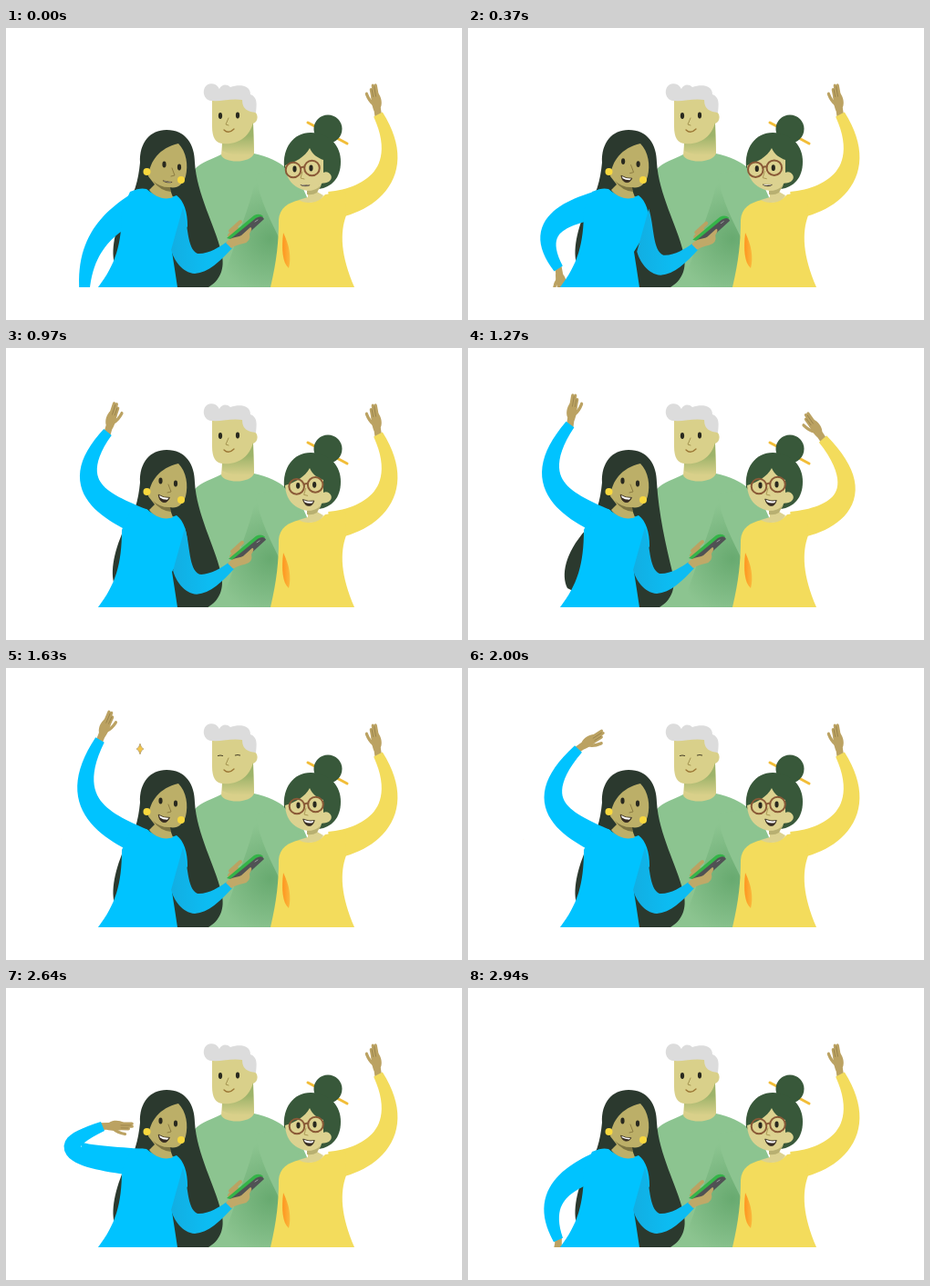
An HTML page for the animation above (2980 ms loop, 500 px wide and 321 px high).

```html
<!DOCTYPE html>
<html lang="en">
<head>
<meta charset="utf-8">
<title>Three friends waving</title>
<style>
  html, body { margin: 0; width: 100%; height: 100%; overflow: hidden; background: #fff; }
  svg { display: block; width: 100vw; height: 100vh; }
  .line { fill: none; stroke-linecap: round; stroke-linejoin: round; }
</style>
</head>
<body>
<svg viewBox="0 0 500 321">
  <defs>
    <clipPath id="floor"><rect width="500" height="285"/></clipPath>
    <radialGradient id="greenShade" gradientUnits="userSpaceOnUse" cx="290" cy="232" r="62">
      <stop offset="0" stop-color="#68aa70"/>
      <stop offset="1" stop-color="#68aa70" stop-opacity="0"/>
    </radialGradient>
    <linearGradient id="neckShade" x2="0" y2="1">
      <stop offset=".4" stop-color="#9db36a"/>
      <stop offset="1" stop-color="#d9d08a"/>
    </linearGradient>
    <linearGradient id="orangeShade">
      <stop offset="0" stop-color="#ff9420"/>
      <stop offset="1" stop-color="#f9b83c"/>
    </linearGradient>
    <linearGradient id="sleeveShade">
      <stop offset="0" stop-color="#12aee2"/>
      <stop offset=".6" stop-color="#0cbcf2"/>
    </linearGradient>
    <g id="hand">
      <path d="M-4.500 4 L-4.500 -7 C-8 -12 -7 -19 -4 -23 L5 -22 C7 -16 6 -9 4.500 -4 L4.500 4 Z"/>
      <path class="line" stroke="#bba262" stroke-width="3.800" d="M-2.500 -20 L-2 -32 M1 -20 L1.500 -32 M4 -19 L4.500 -28 M4 -12 Q9 -16 11 -24"/>
      <path class="line" stroke="#8d7845" stroke-width=".7" d="M-.4 -20 L0 -31 M3 -20 L3.500 -28"/>
    </g>
    <path id="star" d="M0 -7.500 Q1.200 -1.500 5 0 Q1.200 1.500 0 7.500 Q-1.200 1.500 -5 0 Q-1.200 -1.500 0 -7.500 Z" fill="#f3c548" stroke="#8d7238" stroke-width=".7"/>
    <g id="grin">
      <path d="M-7 -3 Q0 0 7 -1.500 Q5 5 0 4.500 Q-5 4 -7 -3 Z" fill="#382d22" stroke="#382d22" stroke-width=".8"/>
      <path d="M-6 -2.300 Q0 .2 6 -1 L4.600 1.300 Q-1 1.900 -4.600 .2 Z" fill="#fff"/>
    </g>
  </defs>

  <use id="starLeft" href="#star"/>
  <use id="starTop" href="#star"/>

  <g clip-path="url(#floor)">
    <g id="man">
      <path fill="#8cc490" d="M206 156 C214 147 227 144 236 139 L272 138 C286 141 300 147 307 154 L322 168 L334 195 L330 285 L205 285 Z"/>
      <path fill="url(#greenShade)" d="M273 163 C272 185 258 215 235 285 L300 285 L300 225 Z"/>
      <path fill="#8cc490" d="M273 160 C278 190 292 215 300 232 L325 190 L307 154 Z"/>
      <path fill="#d9d08a" d="M226 78 L226 108 C226 121 230 126 237 127 L236 140 C240 149 268 149 272 138 L271 105 C277 103 277 94 272 92 L264 75 Z"/>
      <path fill="url(#neckShade)" d="M271 104 L272 138 Q254 143 237 135 L237 127 C255 129 267 119 271 104 Z"/>
      <path fill="#dcdcdc" d="M225 80 C215 79 214 64 223 61.500 C230 60 232 64 234 67 C236 62 242 61 246 65 C255 62 268 62 268 73 C276 76 275 84 274 93 C266 92 259 90 259 79 C247 77 237 81 225 80 Z"/>
      <g id="manEyes"></g>
      <path class="line" stroke="#a3934f" stroke-width="1" d="M244 99 L241 106 L244 107"/>
      <path class="line" stroke="#9b7735" stroke-width="1.300" d="M239 112 Q244 117 250 111"/>
    </g>

    <g id="blueWoman">
      <path id="longHair" fill="#2b392e"/>
      <use id="blueHand" href="#hand" fill="#bba262"/>
      <path id="blueArm" fill="#00c3ff"/>
      <path fill="#00c3ff" d="M136 180 C145 176 150 176 154 177 C162 184 174 189 187 184 C195 190 199 202 199 218 L182 246 Q185 265 188 285 L101 285 C120 260 127 238 127 200 Z"/>
      <path fill="#bcaf68" d="M156 163 C158 146 168 132 189 127 C198 136 200 151 197 163 C194 173 187 177 179 175 L183 186 C174 190 162 185 157 178 L163 172 Z"/>
      <path fill="#7f7643" d="M161 168 Q170 176 180 175 L181 180 Q169 179 161 168 Z"/>
      <g id="blueFace">
        <g id="blueEyes"></g>
        <path class="line" stroke="#8d7d43" stroke-width="1" d="M178 150 L181 158 L177 159"/>
        <use id="blueMouth" href="#grin"/>
      </g>
      <g fill="#f8d83e"><circle cx="154.500" cy="158" r="4"/><circle cx="192" cy="167" r="4"/></g>
      <g id="phoneArm">
        <path fill="url(#sleeveShade)" d="M194 197 C200 215 198 243 210 248 C221 249 234 241 242 235 L248 242 C235 256 222 269 207 270 C193 269 184 255 181 244 Z"/>
        <path class="line" stroke="#bba262" stroke-width="4" d="M246 223 L257 213 M245 228 L253 220"/>
        <path fill="#35b449" d="M242 231 L272 206 Q278 203 282 207 L278 212 L249 233 Z"/>
        <path fill="#505254" d="M246 232 L274 209 Q281 205 283 210 L260 231 Q253 234 246 232 Z"/>
        <path class="line" stroke="#9a9c9e" stroke-width="1" d="M273 213 L276 211"/>
        <path fill="#c0a968" d="M241 236 C247 229 252 231 258 228 L268 219 Q271 220 267 226 Q269 235 260 237 C254 238 250 240 247 242 Z"/>
      </g>
    </g>

    <g id="yellowWoman">
      <use id="yellowHand" href="#hand" fill="#bba262"/>
      <path id="yellowArm" fill="#f3dc5c"/>
      <path fill="#f3dc5c" d="M322 189 Q338 196 350 183 L372 180 L373 206 C366 225 367 250 382 285 L290 285 C297 255 299 235 299 211 C300 198 309 192 322 189 Z"/>
      <path fill="url(#orangeShade)" d="M304 225 C311 239 313 253 310 264 C303 258 302 243 304 225 Z"/>
      <path class="line" stroke="#f2bd38" stroke-width="3" d="M331 104 L374 127"/>
      <circle cx="353" cy="111" r="15.500" fill="#38583a"/>
      <path fill="#38583a" d="M305 153 C303 132 315 115 334 115 C356 116 367 130 367 147 C367 165 357 175 343 177 L318 170 Z"/>
      <path fill="#dcd290" d="M306 151 C316 148 328 142 333 132 C336 139 342 143 348 145 L348 159 C354 156 360 164 355 168 C352 171 348 170 346 171 C345 176 342 178 341 180 L348 184 C344 193 328 194 321 189 L331 186 L331 179 C318 177 307 169 306 151 Z"/>
      <path fill="#b8b071" d="M330 179 Q340 179 345 173 L341 181 Q336 184 330 183 Z"/>
      <g id="yellowFace">
        <g id="yellowEyes"></g>
        <g class="line" stroke="#8a5a37" stroke-width="2">
          <circle cx="319" cy="152" r="8.300"/><circle cx="339.500" cy="150" r="8.300"/>
          <path d="M327 150 Q329 148 331 149"/>
        </g>
        <path class="line" stroke="#ab9955" stroke-width="1" d="M329 154 L327 161 L331 162"/>
        <use id="yellowMouth" href="#grin"/>
      </g>
    </g>
  </g>
</svg>
<script>
const LOOP = 2980;
const $ = id => document.getElementById(id);
const set = (id, name, value) => $(id).setAttribute(name, value);

const ease = (t, from, to) => {
  const u = Math.min(1, Math.max(0, (t - from) / (to - from)));
  return (1 - Math.cos(Math.PI * u)) / 2;
};
const bump = (t, peak, reach) => ease(t, peak - reach, peak) - ease(t, peak, peak + reach);
const mix = (a, b, u) => a.map((v, i) => v + (b[i] - v) * u);

// A pose is elbow x, y, wrist x, y and hand angle.
const blue = {
  down: [86, 230, 86, 290, 180],
  hip: [64, 212, 101, 261, 168],
  raised: [62, 150, 112, 84, 8],
  brow: [33, 181, 106, 152, 88],
  low: [75, 224, 99, 277, 180]
};
const yellow = {
  upright: [443, 160, 408, 95, -8],
  bent: [446, 165, 389, 100, -33]
};

function bluePose(t) {
  const waving = ease(t, 1270, 1630);
  const wave = -waving * Math.cos(2 * Math.PI * (t - 1630) / 740);
  const [elbowX, elbowY, wristX, wristY, angle] = blue.raised;
  const raised = [elbowX, elbowY, wristX + 9 * wave, wristY + 5 * wave, angle + 30 * waving + 17 * wave];
  let pose = mix(blue.down, blue.hip, ease(t, 0, 480));
  pose = mix(pose, raised, ease(t, 670, 1020));
  pose = mix(pose, blue.brow, ease(t, 2230, 2640));
  return mix(pose, blue.low, ease(t, 2640, 2940));
}

function yellowPose(t) {
  return mix(yellow.upright, yellow.bent, bump(t, 670, 300) + bump(t, 1270, 300));
}

// A sleeve that tapers along a cubic curve from shoulder to wrist.
function sleeve(p) {
  const left = [], right = [];
  for (let i = 0; i <= 28; i++) {
    const u = i / 28, v = 1 - u;
    const at = k => v ** 3 * p[k] + 3 * v * v * u * p[k + 2] + 3 * v * u * u * p[k + 4] + u ** 3 * p[k + 6];
    const slope = k => v * v * (p[k + 2] - p[k]) + 2 * v * u * (p[k + 4] - p[k + 2]) + u * u * (p[k + 6] - p[k + 4]);
    const dx = slope(0), dy = slope(1);
    const half = (15 - 9.5 * u ** 1.5) / Math.hypot(dx, dy);
    const x = at(0), y = at(1);
    left.push(`${(x - dy * half).toFixed(2)} ${(y + dx * half).toFixed(2)}`);
    right.unshift(`${(x + dy * half).toFixed(2)} ${(y - dx * half).toFixed(2)}`);
  }
  return `M${left.concat(right).join("L")}Z`;
}

function drawArm(name, shoulder, upperArm, pose, flip) {
  const [elbowX, elbowY, wristX, wristY, angle] = pose;
  set(name + "Arm", "d", sleeve([...shoulder, ...upperArm, elbowX, elbowY, wristX, wristY]));
  set(name + "Hand", "transform", `translate(${wristX} ${wristY}) rotate(${angle}) scale(${flip * .85} 1)`);
}

function addEyes(id, points) {
  $(id).innerHTML = points.map(([x, y]) =>
    `<ellipse cx="${x}" cy="${y}" rx="2.1" ry="3.4" fill="#29291f"/>` +
    `<path class="line" stroke="#4c442a" stroke-width="1.2" d="M${x - 2.5} ${y} Q${x} ${y - 1} ${x + 2.5} ${y}"/>`
  ).join("");
}

function closeEyes(id, closed) {
  for (const part of $(id).children) {
    part.style.display = (part.tagName === "path") === closed ? "" : "none";
  }
}

function drawFace(name, dx, dy, mouthX, mouthY, tilt, open) {
  set(name + "Face", "transform", `translate(${dx} ${dy})`);
  set(name + "Mouth", "transform", `translate(${mouthX} ${mouthY}) rotate(${tilt}) scale(${.7 + .2 * open} ${open})`);
}

function hairPath(sway) {
  const x = v => v + sway;
  return `M147 148 C146 126 158 112 176 112 C197 112 207 128 207 148
    C209 182 ${x(229)} 217 ${x(236)} 246 C${x(241)} 265 ${x(234)} 278 ${x(222)} 285
    L150 285 L${x(121)} 264 C${x(114)} 250 ${x(118)} 226 129 200 C141 184 145 168 147 148Z`;
}

function drawStar(id, x, y, size) {
  set(id, "transform", `translate(${x} ${y}) scale(${size})`);
  $(id).style.display = size < .02 ? "none" : "";
}

function draw(t) {
  const bluePoseNow = bluePose(t);
  const shoulder = [150, 192];
  drawArm("blue", shoulder, mix(shoulder, bluePoseNow, .45), bluePoseNow, 1);
  drawArm("yellow", [355, 195], [397, 190], yellowPose(t), -1);
  set("longHair", "d", hairPath(-12 * bump(t, 1270, 350)));

  const phone = ease(t, 0, 500) - ease(t, 750, 1150);
  set("phoneArm", "transform", `translate(${5 * phone} ${2 * phone})`);

  const blueTurn = 1 - ease(t, 0, 500), yellowTurn = 1 - ease(t, 200, 1150);
  drawFace("blue", 4 * blueTurn, 4 * blueTurn, 173, 165, 8, 1 - .8 * blueTurn - .3 * ease(t, 2640, 2940));
  drawFace("yellow", -4 * yellowTurn, 4 * yellowTurn, 332, 169, 0, 1 - .8 * yellowTurn);

  const laughing = t >= 580 && t < 780;
  closeEyes("blueEyes", laughing);
  closeEyes("yellowEyes", laughing);
  closeEyes("manEyes", t >= 1530 && t < 2150);

  drawStar("starLeft", 61, 188, bump(t, 690, 240) + bump(t, 1820, 210));
  drawStar("starTop", 147, 89, bump(t, 1540, 290));
}

addEyes("manEyes", [[235, 96.500], [254, 96]]);
addEyes("blueEyes", [[169.5, 146], [186, 149]]);
addEyes("yellowEyes", [[320.5, 151], [338.5, 150]]);

const start = performance.now();
function tick() {
  draw((performance.now() - start) % LOOP);
  requestAnimationFrame(tick);
}
draw(0);
requestAnimationFrame(tick);
</script>
</body>
</html>
```
